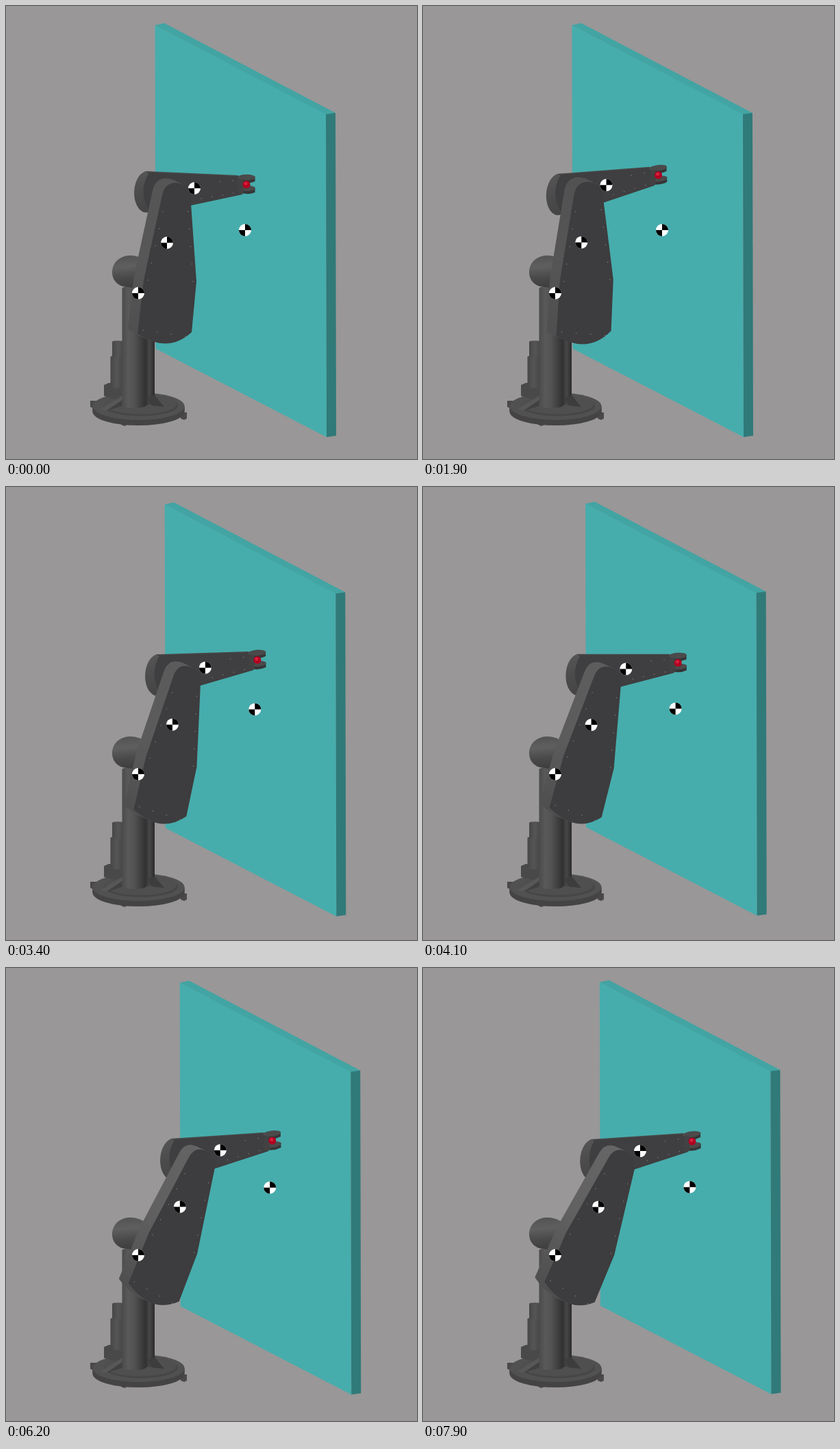
Animation of 600 by 661 pixels, one loop 8 s. Source, as an HTML page with a canvas:

```html
<!DOCTYPE html>
<html lang="en">
<head>
<meta charset="utf-8">
<title>Robot arm pushing a wall</title>
<style>
html, body { margin: 0; height: 100%; overflow: hidden; background: #999798; }
canvas { display: block; }
</style>
</head>
<body>
<canvas width="600" height="661"></canvas>
<script>
const ctx = document.querySelector('canvas').getContext('2d');
const LOOP = 8000, STEP = 100;

// 0 before a, 1 after b, straight in between
const ramp = (t, a, b) => Math.min(1, Math.max(0, (t - a) / (b - a)));

// Draw back, swing into the wall, then push in stages
const reachAt = t => -.63 * ramp(t, 350, 1250) + .94 * ramp(t, 1250, 2600)
  + .11 * ramp(t, 2600, 3900) + .43 * ramp(t, 3900, 4900)
  + .05 * ramp(t, 4900, 6200) + .1 * ramp(t, 7500, 7900);

const tiltAt = t => .12 * ramp(t, 350, 1900) - .074 * ramp(t, 2400, 4100)
  + .066 * ramp(t, 4100, 5700);

const gray = v => `rgb(${v},${v - 1},${v})`;

function fill(path, color) {
  ctx.fillStyle = color;
  ctx.fill(new Path2D(path));
}

function ellipse(x, y, rx, ry, color) {
  ctx.fillStyle = color;
  ctx.beginPath();
  ctx.ellipse(x, y, rx, ry, 0, 0, 7);
  ctx.fill();
}

function shade(x0, y0, x1, y1, ...tones) {
  const g = ctx.createLinearGradient(x0, y0, x1, y1);
  tones.forEach((v, i) => g.addColorStop(i / (tones.length - 1), gray(v)));
  return g;
}

// Upright cylinder
function post(x, w, top, bottom, ...tones) {
  const r = w / 2, paint = shade(x, 0, x + w, 0, ...tones);
  ctx.fillStyle = paint;
  ctx.fillRect(x, top, w, bottom - top);
  ellipse(x + r, top, r, r / 5, paint);
  ellipse(x + r, bottom, r, r / 5, paint);
}

function marker(x, y) {
  ellipse(x, y, 9, 9, '#fff');
  ctx.fillStyle = '#000';
  for (const a of [-Math.PI / 2, Math.PI / 2]) {
    ctx.beginPath();
    ctx.moveTo(x, y);
    ctx.arc(x, y, 9, a, a + Math.PI / 2);
    ctx.fill();
  }
}

// Rivets spread evenly from one point to another
function rivets(x0, y0, x1, y1, n) {
  ctx.fillStyle = '#858385';
  for (let i = 0; i < n; i++) {
    const u = i / (n - 1);
    ctx.fillRect(x0 + (x1 - x0) * u - .6, y0 + (y1 - y0) * u - .6, 1.2, 1.2);
  }
}

function wall(shift) {
  ctx.save();
  ctx.translate(shift, -.18 * shift);
  fill('M217.5 28L231 25L481 156L467 159Z', '#42a4a3');
  fill('M217.5 28L467 158L468 629L218.5 500Z', '#46adac');
  fill('M467 158L481 156L482 627L468 629Z', '#307a79');
  marker(349, 327);
  ctx.restore();
}

function base() {
  for (const [x, y] of [[123, 576], [168, 602], [255, 593]])
    fill(`M${x} ${y}h9v9l-4 2l-5 -2Z`, gray(74));
  for (let y = 592; y > 584; y--) ellipse(193.5, y, 67, 20, gray(69));
  ellipse(193.5, 584, 67, 20, gray(82));
  ellipse(197, 583, 54, 15.5, gray(71));
  ellipse(196, 581, 53, 14.5, gray(80));

  fill('M143 553L150 550H172V577L143 569Z', gray(74));
  post(152.5, 18, 512, 556, 72, 86, 72);
  post(155, 17, 490, 511, 72, 86, 72);
  fill('M171 568L138 588L146 591L171 578Z', gray(88));
  fill('M171 574L146 591L171 583Z', gray(66));

  post(195, 22, 470, 580, 50, 45, 72, 44);
  fill('M217 568L231 585L213 583L206 572Z', gray(62));
  post(169.5, 35, 412, 583, 76, 90, 84, 66, 50);
  fill('M181 364C150 365 147 402 170 409L206 414V373Q195 364 181 364Z',
    shade(176, 364, 180, 412, 84, 96, 74, 62));
}

function forearm(x, y, tilt) {
  ctx.save();
  ctx.transform(1, -tilt, .3 * tilt, 1, x, y);
  fill('M-71 -25C-92 -18 -94 26 -74 35L-60 36L-50 -23Z', shade(-88, -20, -70, 35, 86, 76, 69));
  fill('M-71 -25L63 -19L70 -15L-66 -21Z', gray(72));
  fill('M-66 -23L63 -17.5L70 -14V9L-5 25L-64 36Q-84 6 -66 -23Z', '#3f3e40');
  rivets(10, 15, 57, 7, 4);
  rivets(37, -10, 56, -11, 2);

  // clevis: two rounded prongs
  for (const top of [-16, 0]) {
    fill(`M64 ${top}v5q12 6 24.5 1v-6Z`, gray(54));
    ellipse(76, top, 13, 4.3, gray(75));
  }
  fill('M64 -13H72V8H64Z', gray(67));
  ctx.restore();
}

// A plate turned about the shoulder, swept backwards for its thickness
function upperArm(reach) {
  const plate = 'M192 478L201 400L228 276Q232 258 248 258Q264 259 269 274L278 402L271 476Q236 508 192 478Z';
  const edge = shade(0, 260, 0, 480, 86 + 16 * reach, 88 + 10 * reach, 80);
  const layers = 14;
  for (let i = layers; i >= 0; i--) {
    ctx.save();
    ctx.translate(237.5 - i, 417 - 6.5 * i / layers);
    ctx.transform(1 - .08 * reach, .4 * reach, -.3 * reach, 1 - .03 * reach, 0, 0);
    ctx.translate(-237.5, -417);
    fill(plate, i ? edge : '#3d3c3e');
    if (!i) {
      rivets(229, 300, 207, 400, 5);
      rivets(266, 300, 273, 402, 5);
      rivets(200, 473, 262, 482, 4);
    }
    ctx.restore();
  }
}

function draw(now) {
  const t = Math.floor(now % LOOP / STEP) * STEP;
  const reach = reachAt(t), tilt = tiltAt(t);
  const x = 275 + 42 * reach;
  const y = 266 - 40 * tilt + 5.5 * reach * reach;
  const handY = y - 5.5 - 76 * tilt;

  ctx.fillStyle = '#999798';
  ctx.fillRect(0, 0, 600, 661);
  wall(Math.max(0, 42 * reach - 1.6));
  base();
  forearm(x, y, tilt);
  upperArm(reach);

  ellipse(x + 76, handY, 5.5, 5.5, '#b00020');
  ellipse(x + 75, handY - 1.5, 2.5, 2.5, '#d8203c');
  marker(x, y);
  marker(235 + 21 * reach, 345.5 + 3.2 * reach);
  marker(193, 419);
  requestAnimationFrame(draw);
}

requestAnimationFrame(draw);
</script>
</body>
</html>
```
